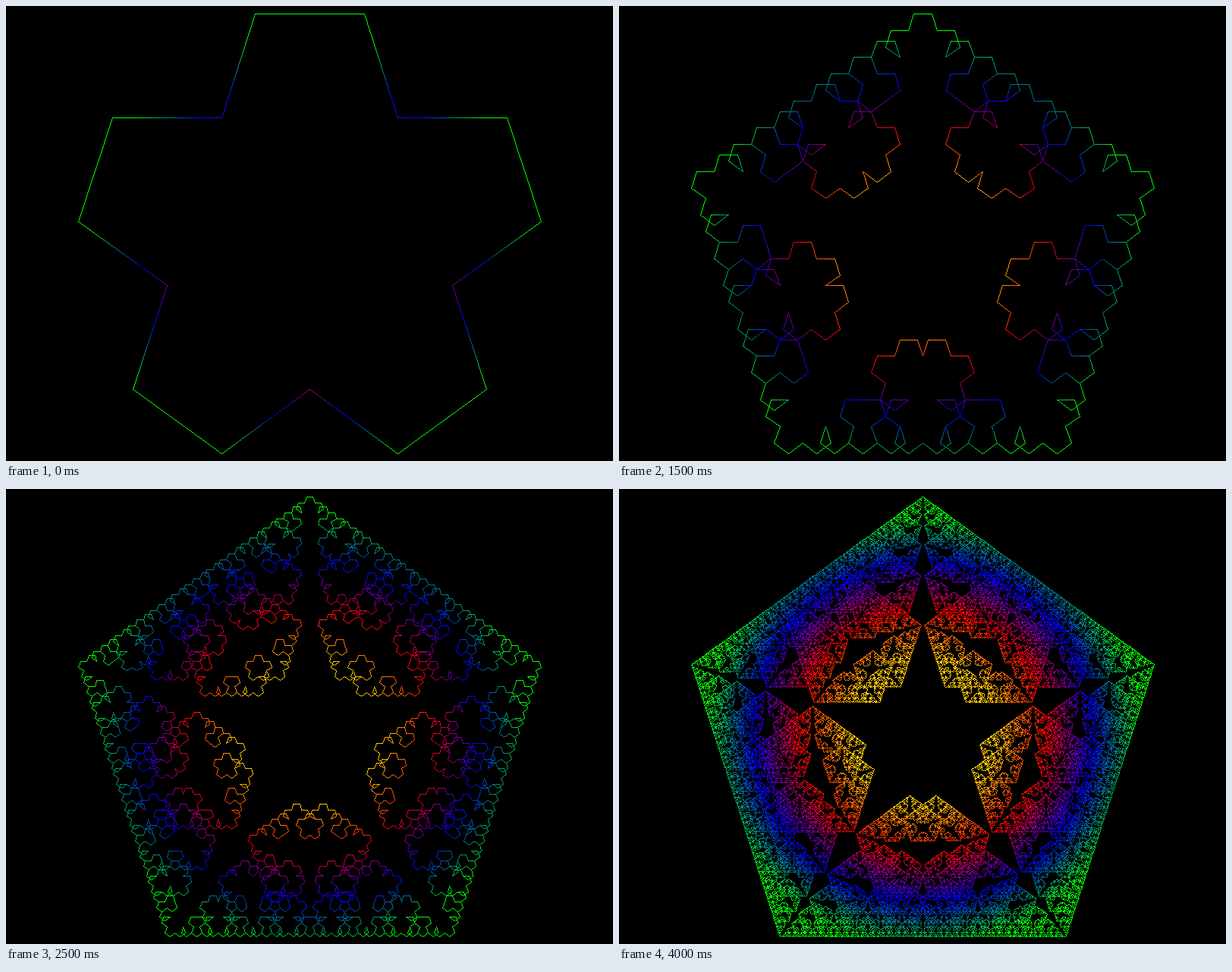
Animation of 800x600 px, one loop 4500 ms. Source, as an HTML page with a canvas:

```html
<!DOCTYPE html>
<html>
<head>
<meta charset="utf-8">
<style>
html, body { margin: 0; width: 100%; height: 100%; overflow: hidden; background: #000; }
canvas { display: block; }
</style>
</head>
<body>
<canvas id="stage" width="800" height="600"></canvas>
<script>
const W = 800, H = 600, MARGIN = 10;
const LEVELS = 9, STEP = 500;
const CENTER = { x: 400, y: 320 };
const STOPS = [
  { r: 96, rgb: [255, 200, 0] },
  { r: 162, rgb: [255, 0, 0] },
  { r: 224, rgb: [0, 0, 255] },
  { r: 286, rgb: [0, 255, 0] }
];
const ctx = document.getElementById('stage').getContext('2d');
const COS = [], SIN = [];
for (let i = 0; i < 5; i++) {
  COS.push(Math.cos(i * Math.PI * 0.4));
  SIN.push(Math.sin(i * Math.PI * 0.4));
}

function radialColor(r) {
  if (r <= STOPS[0].r) return STOPS[0].rgb;
  for (let i = 1; i < STOPS.length; i++) {
    const a = STOPS[i - 1], b = STOPS[i];
    if (r <= b.r) {
      const t = (r - a.r) / (b.r - a.r);
      return a.rgb.map((c, k) => Math.round(c + (b.rgb[k] - c) * t));
    }
  }
  return STOPS[STOPS.length - 1].rgb;
}

// Every edge becomes three sides of a pentagon bulging outwards.
function grow(dirs) {
  const out = new Uint8Array(dirs.length * 3);
  dirs.forEach((d, i) => {
    out[3 * i] = (d + 4) % 5;
    out[3 * i + 1] = d;
    out[3 * i + 2] = (d + 1) % 5;
  });
  return out;
}

function trace(dirs) {
  const xs = [0], ys = [0];
  let x = 0, y = 0, left = 0, right = 0, top = 0, bottom = 0;
  for (const d of dirs) {
    x += COS[d];
    y += SIN[d];
    xs.push(x);
    ys.push(y);
    left = Math.min(left, x);
    right = Math.max(right, x);
    top = Math.min(top, y);
    bottom = Math.max(bottom, y);
  }
  const scale = (H - 2 * MARGIN) / (bottom - top);
  const mid = (left + right) / 2;
  return {
    xs: xs.map(v => Math.round(W / 2 + (v - mid) * scale)),
    ys: ys.map(v => Math.round(MARGIN + (v - top) * scale))
  };
}

function line(x0, y0, x1, y1, plot) {
  const dx = Math.abs(x1 - x0), dy = -Math.abs(y1 - y0);
  const sx = x0 < x1 ? 1 : -1, sy = y0 < y1 ? 1 : -1;
  let err = dx + dy;
  for (;;) {
    plot(x0, y0);
    if (x0 === x1 && y0 === y1) return;
    const e2 = 2 * err;
    if (e2 >= dy) { err += dy; x0 += sx; }
    if (e2 <= dx) { err += dx; y0 += sy; }
  }
}

function render(dirs) {
  const image = ctx.createImageData(W, H);
  const data = image.data;
  for (let i = 3; i < data.length; i += 4) data[i] = 255;
  const plot = (x, y) => {
    const i = 4 * (y * W + x);
    if (data[i] || data[i + 1] || data[i + 2]) return;
    const c = radialColor(Math.hypot(x - CENTER.x, y - CENTER.y));
    data[i] = c[0];
    data[i + 1] = c[1];
    data[i + 2] = c[2];
  };
  const { xs, ys } = trace(dirs);
  for (let i = 1; i < xs.length; i++) line(xs[i - 1], ys[i - 1], xs[i], ys[i], plot);
  return image;
}

const images = [];
let dirs = Uint8Array.of(0, 1, 2, 3, 4);
for (let n = 0; n < LEVELS; n++) {
  dirs = grow(dirs);
  images.push(render(dirs));
}

let shown = -1;
const start = performance.now();
function tick() {
  const elapsed = Math.max(0, performance.now() - start);
  const level = Math.floor(elapsed / STEP) % LEVELS;
  if (level !== shown) {
    ctx.putImageData(images[level], 0, 0);
    shown = level;
  }
  requestAnimationFrame(tick);
}
tick();
</script>
</body>
</html>
```
